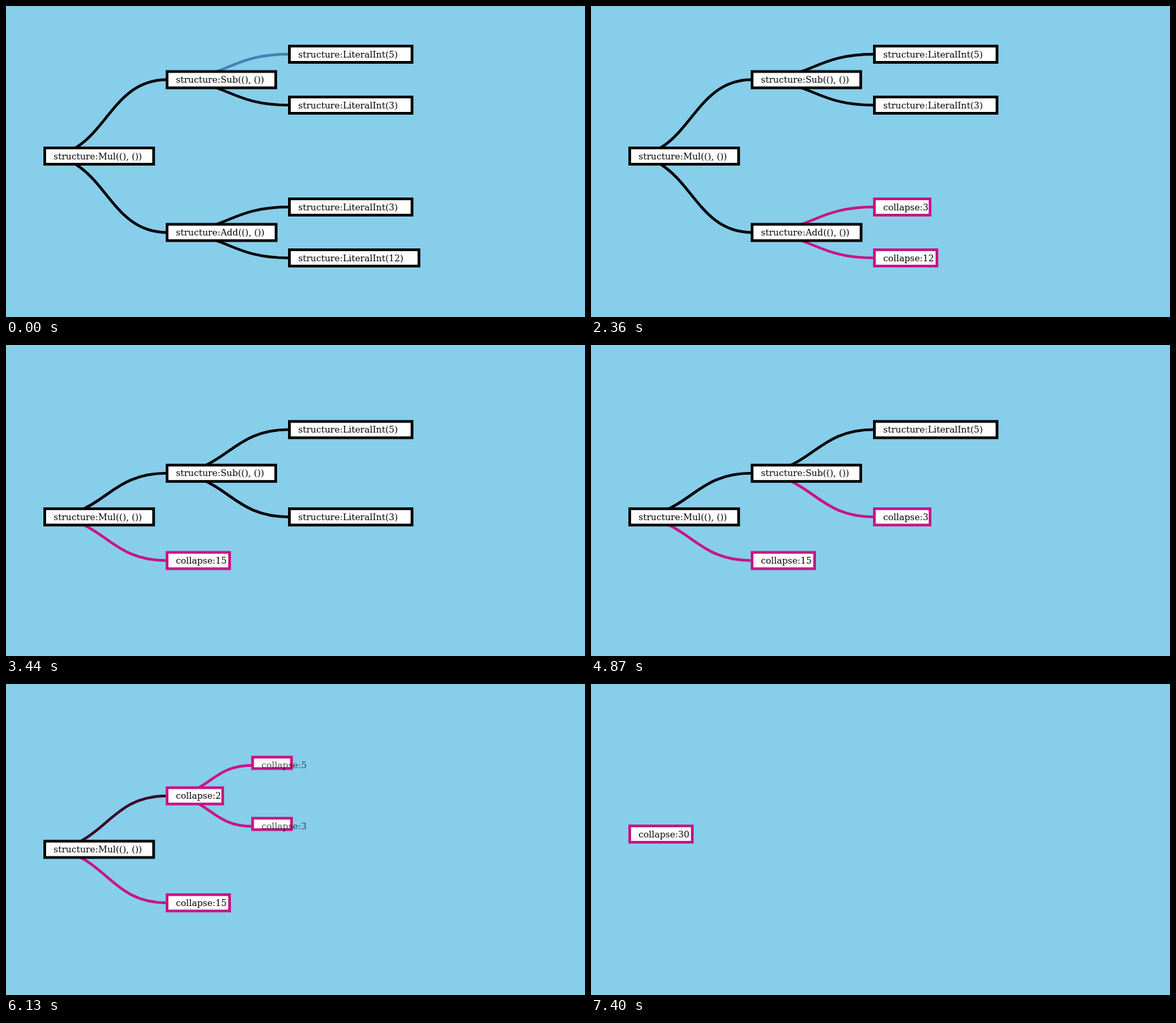
An HTML page for the animation above (8220 ms loop, 852 by 458 pixels).

```html
<!DOCTYPE html>
<html>
<head>
<meta charset="utf-8">
<style>
  html, body { margin: 0; height: 100%; overflow: hidden; background: #87ceeb; }
  svg { display: block; }
  path { fill: none; stroke-width: 4; }
  rect { fill: #fff; stroke-width: 4; }
  text { font: 13px "DejaVu Serif", serif; }
</style>
</head>
<body>
<svg id="stage" width="852" height="458"></svg>
<script>
const LOOP = 8220, FADE = 500;
const BLACK = [0, 0, 0], PINK = [199, 21, 133], BLUE = [70, 130, 180];
// Labels swap at these times; step 0 only darkens the first link
const swaps = [0, 910, 1910, 2930, 3910, 4930, 5910, 6930];
const stage = document.getElementById('stage');
const pen = document.createElement('canvas').getContext('2d');
pen.font = '16px "DejaVu Serif", serif';

// step: when the node is evaluated; ys: its height in each successive layout
const node = (parent, step, name, value, ys) => ({
  parent, step, ys,
  depth: parent ? parent.depth + 1 : 0,
  labels: ['structure:' + name, 'collapse:' + value].map(text =>
    ({ text, width: pen.measureText(text).width }))
});
const literal = (parent, step, value, ys) =>
  node(parent, step, `LiteralInt(${value})`, value, ys);

const mul = node(null, 7, 'Mul((), ())', 30, [221, 253.14, 221, 221]);
const sub = node(mul, 6, 'Sub((), ())', 2, [108.5, 188.86, 108.5, 221]);
const add = node(mul, 3, 'Add((), ())', 15, [333.5, 317.43, 333.5, 221]);
const five = literal(sub, 5, 5, [71, 124.57, 108.5]);
const nodes = [mul, sub, add, five,
  literal(sub, 4, 3, [146, 253.14, 108.5]),
  literal(add, 2, 3, [296, 317.43]),
  literal(add, 1, 12, [371, 317.43])];
const layoutSteps = [3, 6, 7];

const mix = (a, b, p) => a + (b - a) * p;
const rgb = (a, b, p) => `rgb(${a.map((v, i) => Math.round(mix(v, b[i], p)))})`;

function progress(time, step) {
  const u = Math.min(1, Math.max(0, (time - step * 1000 + 80) / FADE));
  return u < 0.5 ? 4 * u ** 3 : 1 - 4 * (1 - u) ** 3;
}

function place(n, time) {
  n.exit = n.parent ? progress(time, n.parent.step) : 0;
  n.x = 57 + 180 * (n.depth - n.exit);
  n.y = layoutSteps.reduce((y, step, i) =>
    mix(y, n.ys[i + 1] ?? y, progress(time, step)), n.ys[0]);
}

function link(n, time) {
  const { x, y, parent: { x: px, y: py } } = n;
  const mid = (x + px) / 2;
  const color = n === five && time < 1000
    ? rgb(BLUE, BLACK, progress(time, 0))
    : rgb(BLACK, PINK, progress(time, n.step));
  return `<path stroke="${color}" d="M${x},${y}C${mid},${y} ${mid},${py} ${px},${py}"/>`;
}

function box(n, time) {
  const done = time >= swaps[n.step];
  const { text, width } = n.labels[+done];
  const left = 1 - n.exit;
  return `<g transform="translate(${n.x},${n.y})">
    <rect y="-12" width="${width * left}" height="${24 * left}" stroke="${rgb(BLACK, PINK, +done)}"/>
    <text x="13" dy=".35em" fill-opacity="${left}">${text}</text></g>`;
}

function draw() {
  const time = performance.now() % LOOP;
  nodes.forEach(n => place(n, time));
  const shown = nodes.filter(n => n.exit < 1);
  stage.innerHTML =
    shown.filter(n => n.parent).map(n => link(n, time)).join('') +
    shown.map(n => box(n, time)).join('');
  requestAnimationFrame(draw);
}
draw();
</script>
</body>
</html>
```
